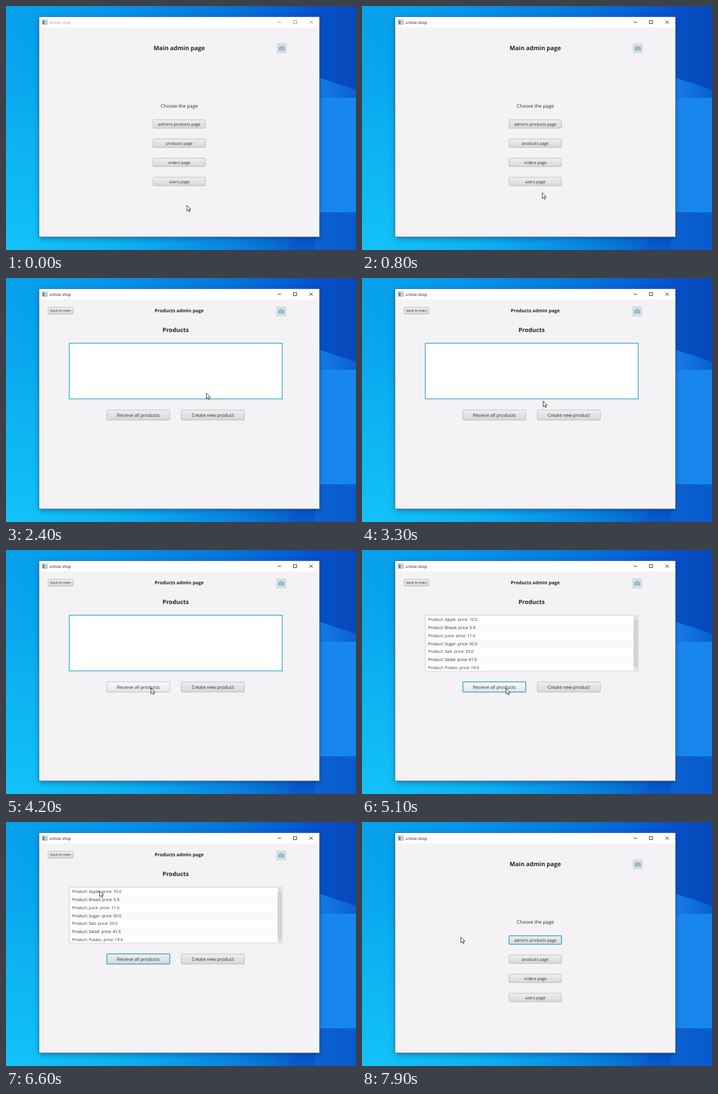
Write an HTML page that moves like this. It is 600 px wide and 420 px high and loops after 8000 ms.

```html
<!DOCTYPE html>
<html lang="en">
<head>
<meta charset="utf-8">
<title>online shop</title>
<style>
  html, body { margin: 0; width: 100%; height: 100%; overflow: hidden; background: #0a8be2; }
  svg { display: block; width: 600px; height: 420px; }
  text {
    font-family: "Open Sans", "Noto Sans", sans-serif;
    fill: #2c2c2e;
    text-rendering: geometricPrecision;
  }
  .mid { text-anchor: middle; }
  .bold { font-weight: 700; fill: #242426; }
  .btn rect { fill: url(#face); stroke: #b4b3b6; stroke-width: .8; }
  .btn.hover rect { fill: url(#faceHover); }
  .btn.pressed rect { fill: url(#facePressed); }
  .btn.focus rect { stroke: #36abc8; stroke-width: 1.5; }
  #bar text { fill: #161616; }
  #bar .sign { stroke: #161616; stroke-width: .9; fill: none; }
  #bar.idle text { fill: #999; }
  #bar.idle .sign { stroke: #888; }
  .off { display: none; }
</style>
</head>
<body>
<svg viewBox="0 0 600 420">
  <defs>
    <linearGradient id="sky" x1="0" y1="0" x2="1" y2="0">
      <stop offset="0" stop-color="#05a4ec"/>
      <stop offset=".3" stop-color="#0593e5"/>
      <stop offset=".65" stop-color="#0672d8"/>
      <stop offset=".9" stop-color="#0750c4"/>
      <stop offset="1" stop-color="#0748ba"/>
    </linearGradient>
    <radialGradient id="glow" gradientUnits="userSpaceOnUse" cx="20" cy="430" r="520">
      <stop offset="0" stop-color="#12c4f8"/>
      <stop offset=".4" stop-color="#0fb6f4" stop-opacity=".75"/>
      <stop offset="1" stop-color="#0a90e8" stop-opacity="0"/>
    </radialGradient>
    <linearGradient id="beam" x1="0" y1="0" x2="1" y2="0">
      <stop offset="0" stop-color="#1680ea"/>
      <stop offset="1" stop-color="#0a5ed2"/>
    </linearGradient>
    <linearGradient id="face" x1="0" y1="0" x2="0" y2="1">
      <stop offset="0" stop-color="#efeef0"/>
      <stop offset="1" stop-color="#d7d6d9"/>
    </linearGradient>
    <linearGradient id="faceHover" x1="0" y1="0" x2="0" y2="1">
      <stop offset="0" stop-color="#fbfafc"/>
      <stop offset="1" stop-color="#e4e3e6"/>
    </linearGradient>
    <linearGradient id="facePressed" x1="0" y1="0" x2="0" y2="1">
      <stop offset="0" stop-color="#d2d1d4"/>
      <stop offset="1" stop-color="#dedde0"/>
    </linearGradient>
    <filter id="soft" x="-10%" y="-10%" width="120%" height="120%">
      <feGaussianBlur stdDeviation="5"/>
    </filter>
    <clipPath id="listClip"><rect x="109" y="112.5" width="364" height="95.3"/></clipPath>
    <g id="camera">
      <rect width="17.5" height="17.5" fill="#d4dfe7"/>
      <path d="M4.6 6.1h2l1-1.4h2.6l1 1.4h2q.6 0 .6.6v5q0 .6-.6.6H4.6q-.6 0-.6-.6v-5q0-.6.6-.6z" fill="#92aabd"/>
      <circle cx="8.9" cy="9.1" r="2" fill="none" stroke="#d4dfe7" stroke-width=".9"/>
    </g>
  </defs>

  <!-- desktop -->
  <rect width="600" height="420" fill="url(#sky)"/>
  <rect width="600" height="420" fill="url(#glow)"/>
  <path d="M530 121L600 144V420H530z" fill="url(#beam)"/>
  <path d="M530 348L600 361V420H480z" fill="#0759cb" opacity=".75"/>
  <rect x="500" y="158" width="197" height="197" fill="#1787ef"/>

  <!-- window -->
  <rect x="57" y="22" width="480" height="378" fill="#002a55" opacity=".45" filter="url(#soft)"/>
  <rect x="56.6" y="18.6" width="480.8" height="379" fill="#f4f2f5" stroke="#48647d" stroke-width=".8"/>
  <rect x="57" y="19" width="480" height="18" fill="#fff"/>
  <g id="bar">
    <rect x="62.2" y="24.2" width="8.4" height="7.2" fill="#eef2f4" stroke="#7b878f" stroke-width=".8"/>
    <rect x="63" y="25.4" width="3.4" height="5.4" fill="#5b8799"/>
    <rect x="67" y="26" width="2.8" height="4.4" fill="#c3ced4"/>
    <text x="74.6" y="30.6" font-size="6.75">online shop</text>
    <path class="sign" d="M465.5 28h6M492.8 25h5.4v5.4h-5.4zM520.2 25l5.6 5.6M525.8 25l-5.6 5.6"/>
  </g>

  <g id="main">
    <text class="mid bold" x="297" y="76" font-size="10.25">Main admin page</text>
    <text class="mid" x="297" y="174.6" font-size="8.2">Choose the page</text>
    <use href="#camera" x="464" y="64.2"/>
  </g>

  <g id="products">
    <text class="mid bold" x="297" y="59.4" font-size="8">Products admin page</text>
    <text class="mid bold" x="290.8" y="93" font-size="10.2">Products</text>
    <use href="#camera" x="463" y="48.6"/>
    <rect id="box" x="108.5" y="112.3" width="365" height="95.8" fill="#fff"/>
    <g id="list">
      <g id="rows" clip-path="url(#listClip)"></g>
      <rect x="465.3" y="112.7" width="7.8" height="95" fill="#ececee"/>
      <rect x="466.6" y="119.6" width="5.2" height="81.5" rx="1.4" fill="#d6d5d8" stroke="#b9b8bb" stroke-width=".7"/>
      <path d="M467.4 116.6l1.8-1.8 1.8 1.8M467.4 204l1.8 1.8 1.8-1.8" fill="none" stroke="#8c8c8e" stroke-width=".8"/>
    </g>
  </g>

  <path id="cursor" d="M0 0V9.9L2.3 7.8 3.9 11.3 5.5 10.6 3.9 7.2H7z" fill="#fff" stroke="#111" stroke-width=".8" stroke-linejoin="round"/>
</svg>
<script>
const $ = id => document.getElementById(id);
const LOOP = 8000, STEP = 100;
const ACTIVE = 700, OPEN = 1900, RECEIVE = 4500, BACK = 7300;

function make(tag, attrs, parent, label = "") {
  const el = document.createElementNS("http://www.w3.org/2000/svg", tag);
  for (const key in attrs) el.setAttribute(key, attrs[key]);
  el.textContent = label;
  return parent.appendChild(el);
}

function button(page, label, x, y, width, height, size) {
  const el = make("g", { class: "btn" }, $(page));
  make("rect", { x, y, width, height, rx: 1.6 }, el);
  make("text", { class: "mid", x: x + width / 2, y: y + height / 2 + size * .36, "font-size": size }, el, label);
  const hit = (px, py) => px >= x && px <= x + width && py >= y && py <= y + height;
  return { el, hit };
}

const [admin] = ["admin's products page", "products page", "orders page", "users page"]
  .map((label, i) => button("main", label, 252, 195.8 + i * 33, 90, 14.6, 6.87));
const back = button("products", "back to main", 72, 50.3, 43, 11.8, 5.85);
const receive = button("products", "Receive all products", 172.8, 227, 108, 17.6, 7.95);
const create = button("products", "Create new product", 300.5, 227, 108, 17.6, 7.95);

const goods = ["Apple", 10, "Bread", 5, "Juice", 11, "Sugar", 50, "Salt", 33, "Salad", 41, "Potato", 19];
for (let i = 0; i < 7; i++) {
  const y = 112.8 + i * 13.8;
  make("rect", { x: 109, y, width: 364, height: 13.8, fill: i % 2 ? "#f9f8fa" : "#fff" }, $("rows"));
  make("text", { x: 113.4, y: y + 9.4, "font-size": 6.88 }, $("rows"),
    `Product: ${goods[2 * i]}- price: ${goods[2 * i + 1].toFixed(1)}`);
}

// time, x, y of the pointer tip
const path = [
  [0, 310, 343], [600, 310, 343], [1400, 304, 204], [1600, 303.5, 202.5], [1900, 303.5, 202.5],
  [2400, 343.5, 198], [2900, 343.5, 198], [3900, 250, 237], [4200, 248.5, 237.5], [4600, 247, 238],
  [5400, 247, 238], [6300, 162, 124], [6600, 160.5, 118.5], [7100, 95, 57], [7400, 95, 57],
  [7800, 169.5, 198], [8000, 169.5, 198]
];

function pointer(t) {
  const i = path.findIndex(p => p[0] > t);
  const [t0, x0, y0] = path[i - 1], [t1, x1, y1] = path[i];
  const u = (t - t0) / (t1 - t0), k = u * u * (3 - 2 * u);
  return [x0 + (x1 - x0) * k, y0 + (y1 - y0) * k];
}

const near = (t, click) => t >= click - STEP && t < click;

function draw(now) {
  const t = Math.floor(now % LOOP / STEP) * STEP;
  const [x, y] = pointer(t);
  const onProducts = t >= OPEN && t < BACK, loaded = t >= RECEIVE;

  $("cursor").setAttribute("transform", `translate(${x} ${y})`);
  $("bar").classList.toggle("idle", t < ACTIVE);
  $("main").classList.toggle("off", onProducts);
  $("products").classList.toggle("off", !onProducts);
  $("list").classList.toggle("off", !loaded);
  $("box").setAttribute("stroke", loaded ? "#c4c3c6" : "#36b0cc");
  $("box").setAttribute("stroke-width", loaded ? .8 : 1.4);

  for (const b of [admin, back, receive, create]) b.el.classList.toggle("hover", b.hit(x, y));
  admin.el.classList.toggle("pressed", near(t, OPEN));
  receive.el.classList.toggle("pressed", near(t, RECEIVE));
  back.el.classList.toggle("pressed", near(t, BACK));
  admin.el.classList.toggle("focus", near(t, OPEN) || t >= BACK);
  receive.el.classList.toggle("focus", loaded && !near(t, BACK));
  back.el.classList.toggle("focus", near(t, BACK));
}

const start = performance.now();
function tick() {
  draw(performance.now() - start);
  requestAnimationFrame(tick);
}
tick();
</script>
</body>
</html>
```
